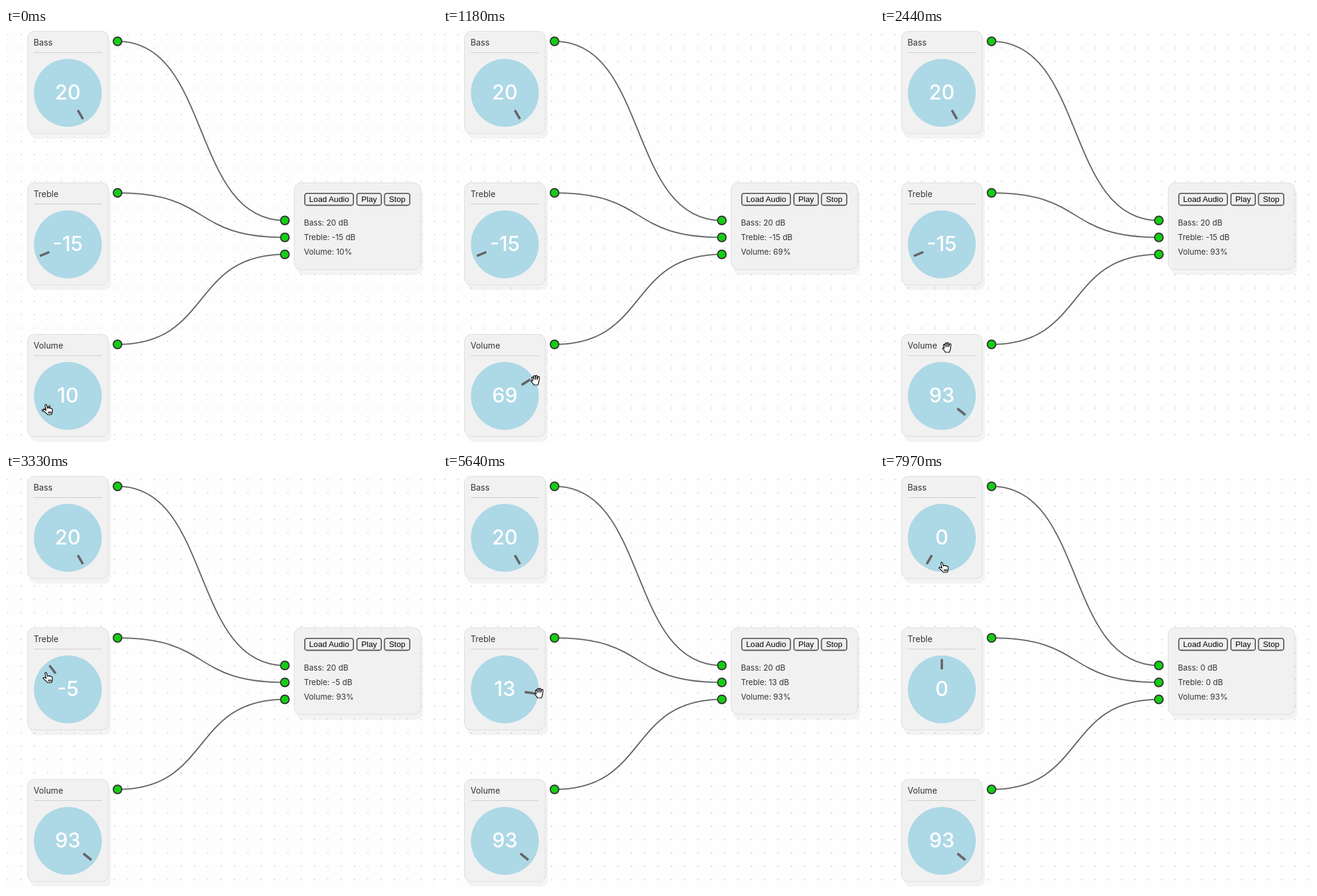
An HTML page for the animation above (8000 ms loop, 711 by 688 pixels).

```html
<!DOCTYPE html>
<html lang="en">
<head>
<meta charset="utf-8">
<title>Audio mixer nodes</title>
<style>
  html, body { margin: 0; width: 100%; height: 100%; overflow: hidden; background: #fefefe; }
  svg { display: block; }
  text { font: 13px Inter, sans-serif; fill: #333; white-space: pre; }
  .title { font-size: 13.8px; }
  .value { font-size: 33.5px; font-weight: 500; fill: #fff; text-anchor: middle; }
  .button text { font: 13.2px "Liberation Sans", sans-serif; fill: #000; text-anchor: middle; }
  .button rect { fill: #efefef; stroke: #555; stroke-width: 1.8; }
  .card { fill: #f1f1f1; stroke: #dcdcdc; }
  .shadow { fill: #000; opacity: .045; }
  .wire { fill: none; stroke: #666; stroke-width: 2; }
  .port { fill: #13ce13; stroke: #333; stroke-width: 2; }
  .cursor { fill: #fff; stroke: #000; stroke-width: 1.2; stroke-linejoin: round; stroke-linecap: round; }
  .cursor.move { fill: #000; stroke: #fff; stroke-width: .6; }
</style>
</head>
<body>
<svg id="stage" width="711" height="688" viewBox="0 0 711 688">
  <defs>
    <pattern id="dots" x="-8" y="0" width="22" height="22" patternUnits="userSpaceOnUse">
      <circle cx="11" cy="11" r=".9" fill="#c4c4c4"/>
    </pattern>
  </defs>
  <rect width="711" height="688" fill="url(#dots)"/>
</svg>
<script>
const LOOP = 8000;
const CENTER_X = 102, KNOB_RADIUS = 56;
const SWEEP = 150;      // a dial turns this many degrees either side of straight up
const LAG = 25;         // the dial trails the hand by this many ms
const WIRE_PULL = 156;  // length of the wires' horizontal handles
const stage = document.getElementById('stage');

function add(tag, attrs, parent = stage) {
  const node = document.createElementNS('http://www.w3.org/2000/svg', tag);
  for (const key in attrs) node.setAttribute(key, attrs[key]);
  parent.append(node);
  return node;
}

function label(x, y, text, cls = '', parent = stage) {
  const node = add('text', { x, y, class: cls }, parent);
  node.textContent = text;
  return node;
}

function card(x, y, width, height) {
  add('rect', { x: x + 4, y: y + 8.5, width, height, rx: 11, class: 'shadow' });
  add('rect', { x, y, width, height, rx: 11, class: 'card' });
}

const bass = { name: 'Bass', unit: ' dB', min: 0, max: 20, initial: 20, drag: [7450, 7625] };
const treble = { name: 'Treble', unit: ' dB', min: -20, max: 20, initial: -15, drag: [3130, 6245] };
const volume = { name: 'Volume', unit: '%', min: 0, max: 100, initial: 10, drag: [90, 1945] };
const knobs = [bass, treble, volume];

// The hand rests from the first to the second time, at an angle and distance from a knob's centre.
const poses = [
  [0, 90, volume, -113, 39],
  [880, 880, volume, -20, 50],
  [1180, 1180, volume, 63, 57],
  [1660, 1660, volume, 114, 63],
  [1920, 2130, volume, 129, 64],
  [2830, 3130, treble, -114, 46],
  [3240, 3240, treble, -3, 50],
  [3330, 3330, treble, -53, 45],
  [3560, 3560, treble, -105, 45],
  [3910, 3910, treble, -38, 46],
  [4720, 5000, treble, -147, 106],
  [5560, 5560, treble, -255, 60],
  [5800, 5800, treble, -282, 53],
  [6220, 6550, treble, -363, 51],
  [7040, 7450, bass, 151, 48],
  [7600, 7860, bass, 212, 50],
  [7970, LOOP, bass, 180, 41]
].map(([from, to, knob, angle, radius]) => ({ from, to, knob, angle, radius }));

const mix = (a, b, f) => a + (b - a) * f;

function polar(knob, angle, radius) {
  const rad = angle * Math.PI / 180;
  return { x: CENTER_X + radius * Math.sin(rad), y: knob.cy - radius * Math.cos(rad) };
}

// Circles while staying on one knob, goes straight between knobs.
function handAt(t) {
  const i = poses.findIndex(pose => t <= pose.to);
  const b = poses[i], a = poses[i - 1] || b;
  const f = t >= b.from ? 1 : (t - a.to) / (b.from - a.to);
  if (a.knob === b.knob) return polar(a.knob, mix(a.angle, b.angle, f), mix(a.radius, b.radius, f));
  const p = polar(a.knob, a.angle, a.radius), q = polar(b.knob, b.angle, b.radius);
  return { x: mix(p.x, q.x, f), y: mix(p.y, q.y, f) };
}

function valueAt(knob, t) {
  const [start, end] = knob.drag;
  if (t < start + LAG) return knob.initial;
  const hand = handAt(Math.min(t, end) - LAG);
  const angle = Math.atan2(hand.x - CENTER_X, knob.cy - hand.y) * 180 / Math.PI;
  const turn = Math.max(-SWEEP, Math.min(SWEEP, angle));
  return Math.round(mix(knob.min, knob.max, (turn + SWEEP) / (2 * SWEEP))) || 0;
}

card(475.5, 255.5, 208.5, 143);
[['Load Audio', 492, 82], ['Play', 578, 42], ['Stop', 623.5, 43.5]].forEach(([text, x, width]) => {
  const button = add('g', { class: 'button' });
  add('rect', { x: x + .9, y: 272.9, width: width - 1.8, height: 19.6, rx: 3.5 }, button);
  label(x + width / 2, 287.3, text, '', button);
});

knobs.forEach((knob, i) => {
  const top = knob.top = 5 + 250 * i;
  const outY = top + 17, inY = 317.5 + 28 * i;
  knob.cy = top + 102;
  card(35.5, top + .5, 133.5, 168.5);
  label(45.5, top + 24, knob.name, 'title');
  add('path', { d: `M46 ${top + 35.5}H158`, stroke: '#ccc' });
  add('circle', { cx: CENTER_X, cy: knob.cy, r: KNOB_RADIUS, fill: '#add8e6' });
  knob.marker = add('rect', { x: CENTER_X - 2, y: top + 52, width: 4, height: 17, rx: 1, fill: '#666' });
  knob.number = label(CENTER_X, top + 112.5, '', 'value');
  knob.readout = label(491.5, 326 + 24 * i, '');
  add('path', { d: `M184 ${outY}C${184 + WIRE_PULL} ${outY} ${460 - WIRE_PULL} ${inY} 460 ${inY}`, class: 'wire' });
  add('circle', { cx: 184, cy: outY, r: 7, class: 'port' });
  add('circle', { cx: 460, cy: inY, r: 7, class: 'port' });
});

const shapes = {
  pointer: 'M-1.6 .8C-2 -1 .6 -1.4 1.1 .3L2.6 5.6C3.4 4 5 4.2 5.4 5.4C6.4 4.4 7.8 4.8 8.2 6.2' +
    'C9.4 5.6 10.4 6.4 10.6 8C10.8 10 10.4 12.4 9.2 15.6L2.6 16C1 13.4 -2 11.4 -4.4 9.4' +
    'C-5.4 8 -3.4 6.6 -1.6 7.8L.2 9ZM4 11V13.6M6 11V13.6M8 11V13.6',
  grab: 'M-5 1.5L-6.5 -3.5C-6.8 -5.4 -4.6 -5.8 -4.1 -4.2L-3 -1L-3.6 -6C-3.6 -8 -1.2 -8 -1 -6.2L-.5 -1' +
    'L-.2 -6.6C0 -8.4 2.2 -8.2 2.2 -6.4V-1L3.6 -5.2C4.4 -6.8 6.4 -5.8 6 -4.2L5.4 1.4C5.2 4 4 5.4 3.6 8' +
    'H-3C-4 5.6 -6.4 3.8 -7.6 2.2C-8.2 .6 -6.4 0 -5 1.5Z',
  move: 'M-1 -1V-4H-3L0 -7.5L3 -4H1V-1H4V-3L7.5 0L4 3V1H1V4H3L0 7.5L-3 4H-1V1H-4V3L-7.5 0L-4 -3V-1Z'
};
const cursor = add('path', {});

function cursorKind({ x, y }) {
  if (knobs.some(knob => Math.hypot(x - CENTER_X, y - knob.cy) < KNOB_RADIUS)) return 'pointer';
  const onCard = knobs.some(({ top }) => x > 35 && x < 169 && y > top && y < top + 169);
  return onCard ? 'grab' : 'move';
}

function draw(t) {
  for (const knob of knobs) {
    const value = valueAt(knob, t);
    const angle = mix(-SWEEP, SWEEP, (value - knob.min) / (knob.max - knob.min));
    knob.marker.setAttribute('transform', `rotate(${angle} ${CENTER_X} ${knob.cy})`);
    knob.number.textContent = value;
    knob.readout.textContent = `${knob.name}: ${value}${knob.unit}`;
  }
  const hand = handAt(t), kind = cursorKind(hand);
  cursor.setAttribute('class', `cursor ${kind}`);
  cursor.setAttribute('d', shapes[kind]);
  cursor.setAttribute('transform', `translate(${Math.round(hand.x)} ${Math.round(hand.y)})`);
}

const start = performance.now();
function frame() {
  draw((performance.now() - start) % LOOP);
  requestAnimationFrame(frame);
}
frame();
</script>
</body>
</html>
```
